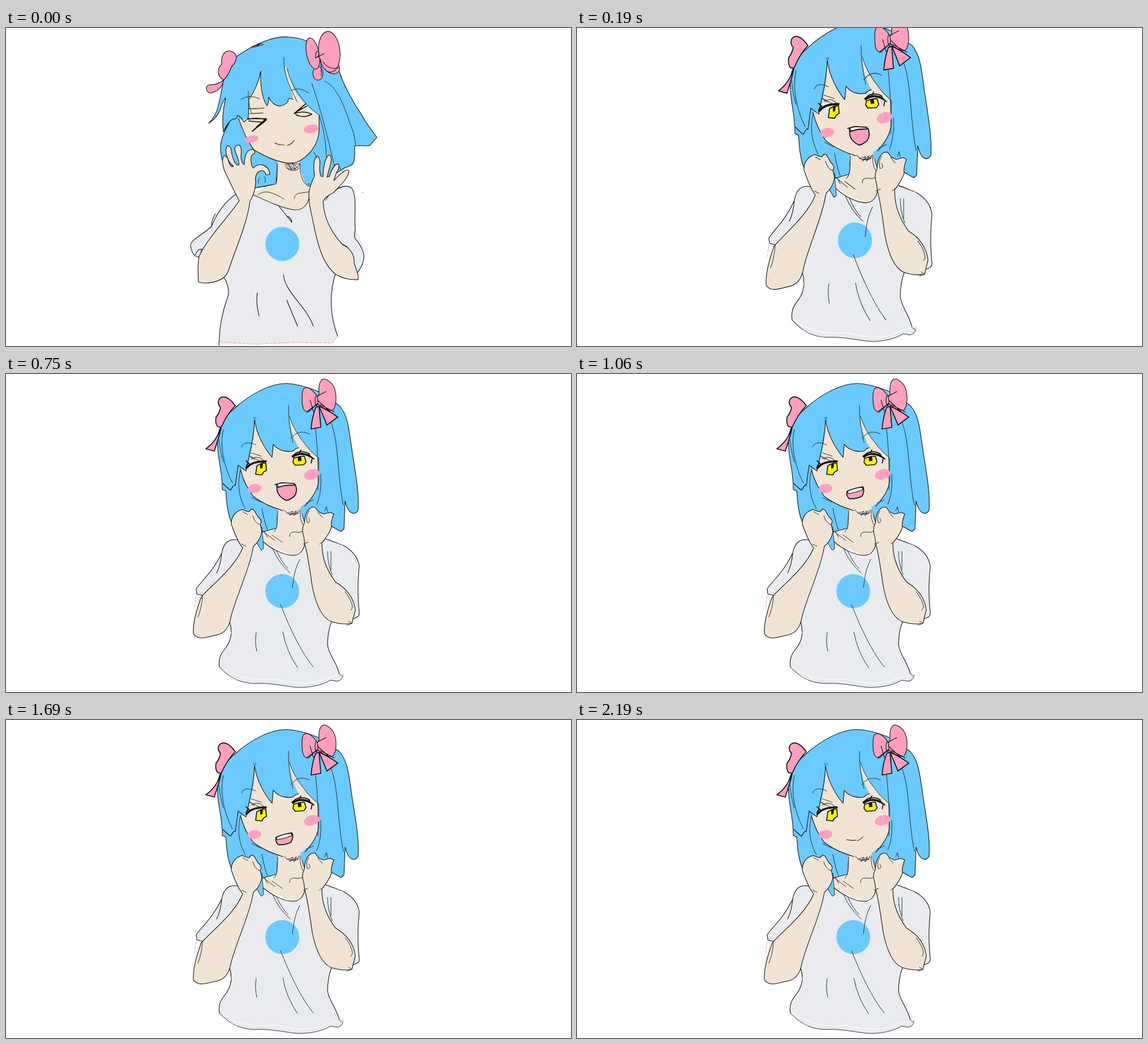
An HTML page for the animation above (2250 ms loop, 998 by 561 pixels).

```html
<!DOCTYPE html>
<html lang="en">
<head>
<meta charset="utf-8">
<title>Cheer and chat</title>
<style>
html, body { margin: 0; width: 100%; height: 100%; overflow: hidden; background: #fff; }
svg { display: block; width: 100vw; height: 100vh; }
path, ellipse { fill: none; stroke-linecap: round; stroke-linejoin: round; }
.line { stroke: #111; stroke-width: 1.1; }
.soft { stroke: #26323a; stroke-width: 1; }
.bold { stroke: #111; stroke-width: 1.7; }
.lash { stroke: #111; stroke-width: 3.6; }
.hem { stroke: #ee9db0; stroke-width: 1; stroke-dasharray: 5 3; }
.hair { fill: #6bcaff; }
.skin { fill: #f1e4d4; }
.shirt { fill: #e9ebee; }
.pink { fill: #ff9fbd; }
.blush { fill: #ff9fc0; }
.mark { fill: #6bcaff; }
.white { fill: #fff; }
.sclera { fill: #e4e5eb; }
.iris { fill: #fff200; }
.ink { fill: #111; }
</style>
</head>
<body>
<svg viewBox="0 0 998 561">
<g id="cheer">
  <path class="hair line" d="M405 52C440 27 475 13 500 16C514 17 526 20 535 25L588 74C594 96 612 130 630 156C638 172 650 185 655 193C650 199 645 204 643 207C636 210 628 206 616 208C616 225 617 237 610 242C602 246 597 246 592 251L545 279L522 279L519 238L479 238L477 275L440 282L388 250C379 230 377 210 381 197C384 186 388 178 394 168Q388 177 384 183C381 160 384 140 388 123Q381 132 378 145Q371 161 358 168Q371 155 375 137C379 120 382 105 384 92C387 76 396 62 405 52Z"/>
  <path class="skin" d="M479 232L478 273C465 281 445 284 432 294L440 310L520 322L545 294L530 276Q521 262 519 235Z"/>
  <path class="soft" d="M479 238C480 255 479 268 477 275Q459 280 441 282M519 238C519 254 521 268 530 276L537 275M456 262Q460 266 457 272M449 264Q444 269 446 274"/>

  <path class="shirt" d="M408 292C388 305 373 325 363 350C346 366 325 374 326 384C328 399 335 405 342 404L383 437C394 453 396 468 389 482C379 513 377 535 376 558L577 556L586 543C573 510 570 470 582 434L624 432C637 405 634 385 617 356C614 330 621 299 611 283C600 273 578 284 562 299L537 300Q530 316 518 320C500 323 473 309 432 295Z"/>
  <path class="line" d="M408 292C388 305 373 325 363 350C346 366 325 374 326 384C328 399 335 405 342 404L346 390L340 391L334 400M363 350Q363 338 370 328M432 292C460 305 490 319 510 321Q532 322 537 293M562 303C578 284 600 273 611 283C621 299 614 330 617 356Q613 370 620 375C634 395 635 404 628 420L620 433M383 437C394 453 396 468 389 482C379 513 377 535 376 560M582 434C570 470 573 510 586 544"/>
  <path class="hem" d="M372 558L376 553L440 558L510 554L577 556L586 543"/>
  <path class="soft" d="M445 294Q455 287 466 290Q480 294 491 302M509 301Q511 290 523 291L535 289"/>
  <ellipse class="mark" cx="488" cy="381" rx="30" ry="30"/>
  <path class="line" d="M481 313L505 343M496 332Q503 333 505 342M444 467Q441 483 447 508M490 435C493 467 530 490 543 526M496 480Q504 500 515 526"/>

  <path class="skin" d="M411 160Q422 164 428 158L429 126Q444 105 450 77C449 100 452 124 461 137Q464 133 464 122C473 140 487 142 498 130Q497 121 507 126C505 105 492 87 493 67C504 84 503 105 516 119Q533 143 553 153L553 181C551 208 532 229 513 237C491 243 462 229 438 216Q418 189 411 160Z"/>
  <path class="line" d="M384 183Q392 165 400 161Q408 161 409 154Q417 158 420 166Q426 162 428 158L429 126Q444 105 450 77C449 100 452 124 461 137Q464 133 464 122C473 140 487 142 498 130Q497 121 507 126M411 160Q422 194 438 215C462 229 491 243 513 237C532 229 552 208 553 181L553 153"/>
  <path class="soft" d="M491 52C489 84 503 105 514 130M497 72C503 105 532 140 553 153M415 126Q430 116 448 125M428 112Q427 134 434 150M503 110Q520 103 535 115M540 97C560 155 572 210 580 243M563 94C590 106 600 150 614 185L618 207M553 154C565 185 565 220 567 240M450 76L448 81"/>
  <path class="line" d="M434 33L452 27M437 34L455 29M442 33L448 28M429 142Q442 143 456 141M430 151L454 150"/>
  <path class="bold" d="M428 161Q444 157 460 162L435 182M429 164Q442 166 456 166L438 179M427 160L460 160L442 175M529 134L509 151Q526 145 540 152Q526 160 512 153M531 138L511 149"/>
  <path class="line" d="M475 203Q483 207 491 206M497 207Q505 205 509 198"/>
  <ellipse class="blush" cx="434" cy="196" rx="12" ry="6" transform="rotate(-12 434 196)"/>
  <ellipse class="blush" cx="539" cy="178" rx="13" ry="7.5" transform="rotate(-12 539 178)"/>
  <path class="soft" d="M492 242Q505 258 520 240L494 240L506 250L498 240L512 250L505 238L516 247M495 247Q507 256 517 248"/>

  <path class="pink line" d="M384 92C373 85 372 72 381 64C379 43 391 36 402 43C411 50 406 60 398 69Q393 84 384 92C384 102 374 112 362 115C352 114 351 101 360 100Q373 101 384 92Z"/>
  <ellipse class="pink line" cx="551" cy="80" rx="9" ry="12"/>
  <ellipse class="pink line" cx="576" cy="69" rx="14" ry="11" transform="rotate(30 576 69)"/>
  <ellipse class="pink line" cx="542" cy="45" rx="11" ry="28" transform="rotate(-12 542 45)"/>
  <ellipse class="pink line" cx="571" cy="42" rx="19" ry="36" transform="rotate(-5 571 42)"/>
  <path class="line" d="M547 52Q546 41 551 41Q556 48 547 53L562 45M556 55Q557 70 557 84M560 60Q570 75 588 70"/>

  <path class="skin line" d="M412 305C404 290 397 275 388 256C381 243 381 227 386 225Q392 227 394 238Q397 246 402 244C390 235 385 215 391 208Q397 207 398 216C400 232 406 243 411 242C414 235 404 220 404 212Q407 205 413 207Q417 213 415 225Q415 238 421 241C421 228 424 215 435 214Q441 216 439 221Q431 224 433 236Q433 243 437 247C448 235 465 243 466 258Q463 260 459 258Q456 249 447 253Q439 258 441 272Q440 292 431 305C426 345 407 385 394 425Q387 450 349 450L340 448Q338 420 341 403C354 373 392 334 412 305Z"/>
  <path class="skin line" d="M545 261C542 240 545 226 550 226Q556 230 554 245Q554 258 557 262L560 262C560 244 565 224 572 224Q577 230 572 245L567 263L571 262C575 250 581 239 587 240Q590 246 584 255L579 269C588 260 601 246 606 252C604 266 591 277 578 291Q565 296 560 306C562 338 575 360 594 382Q616 392 615 415L622 436L622 444Q600 445 583 435C553 412 547 361 539 326Q535 309 535 292Q536 279 545 261Z"/>
  <path class="soft" d="M544 219Q548 225 549 230M588 243L592 251M592 380L603 386M565 304L570 296M630 290L631 291"/>
</g>

<g id="talk">
  <path id="mane" class="hair line"/>
  <path class="skin" d="M480 234L478 274L456 279L453 296L508 321L534 302L527 270L520 234Z"/>
  <path class="soft" d="M480 242L479 265Q478 274 473 279M520 240Q518 259 526 267"/>

  <path class="shirt" d="M410 293Q386 288 381 316C365 350 345 365 336 379L337 388L353 392L395 437C402 460 395 475 385 487Q374 500 377 517C395 535 410 545 440 546C470 544 500 553 520 553C550 552 565 545 573 540L585 542Q594 540 595 533L589 530C585 510 570 495 568 478Q568 455 575 437L612 432Q625 429 624 422C621 390 621 370 624 339Q621 316 595 302L565 291L528 298Q525 318 508 320C490 320 468 308 453 295Z"/>
  <path class="line" d="M410 293Q386 288 381 316C365 350 345 365 336 379L337 388L353 392M381 316Q379 338 372 351M395 437C402 460 395 475 385 487Q374 500 377 517M453 295C468 308 490 320 508 320Q525 318 528 298M565 291L595 302Q621 316 624 339C621 370 621 390 624 422Q625 429 612 432M575 437Q568 455 568 478C570 495 585 510 589 530"/>
  <path class="soft" d="M377 517C395 535 410 545 440 546C470 544 500 553 520 553C550 552 565 545 573 540L585 542Q594 540 595 533L589 530"/>
  <path d="M379 515C410 540 445 541 475 538C510 548 540 548 566 537L590 530" stroke="#fff"/>
  <path class="hem" d="M390 530L408 540M570 291L595 302M396 448L399 463M336 391L333 411M587 528L596 529L594 537"/>
  <path class="soft" d="M453 277L475 294M462 288L456 277M470 284L488 297M501 287Q500 277 513 279Q521 281 527 274"/>
  <ellipse class="mark" cx="488" cy="383" rx="30" ry="30"/>
  <path class="soft" d="M471 308Q481 333 502 351M478 312Q488 334 498 343M519 327C510 344 508 359 506 377M485 407C502 450 521 490 543 517M489 455Q495 489 515 518M442 456Q439 473 443 489M568 313Q568 335 576 354M574 313L574 346"/>

  <path class="skin" d="M414 168Q424 170 428 158Q440 112 439 80C442 106 457 132 470 147Q471 137 472 124C481 135 494 138 507 136Q511 131 517 130C508 115 500 91 501 75C507 95 517 110 527 122Q535 134 552 148L552 191C548 212 530 232 508 241C485 244 456 230 437 216Q421 196 414 168Z"/>
  <path class="line" d="M383 193Q393 203 397 205Q403 193 405 197Q407 182 410 161Q417 166 424 171Q429 146 433 128Q438 104 439 80C442 106 457 132 470 147Q471 137 472 124C481 135 494 138 507 136Q511 131 517 130M414 168Q421 196 437 216C456 230 473 236 489 241M528 233Q548 212 552 191L552 148"/>
  <path class="soft" d="M437 78Q440 75 442 79M499 55Q498 84 507 121M501 75C507 95 517 110 527 122Q535 134 552 148M416 129Q421 116 441 125M503 114Q517 96 536 106M546 90C550 125 552 160 551 204M574 85C588 120 585 180 596 232M384 98C376 130 388 170 400 192M376 115Q379 140 384 155M414 170C407 200 414 222 423 238M452 237Q456 260 462 275M556 177Q558 210 549 230M439 151L429 144L455 157M433 150Q445 142 456 153M433 139L451 145M434 218L450 226M530 228L543 222"/>
  <ellipse class="blush" cx="439" cy="202" rx="12" ry="8" transform="rotate(-8 439 202)"/>
  <ellipse class="blush" cx="540" cy="177" rx="14" ry="9" transform="rotate(-18 540 177)"/>
  <path class="soft" d="M491 240Q505 256 519 239M496 246L507 242L501 250L513 241L508 250L518 243M500 247L516 246"/>

  <g id="eyesOpen">
    <path class="sclera" d="M428 166Q434 156 446 157L442 177Q433 174 428 166ZM508 147Q522 138 538 145L531 160L510 158Z"/>
    <path class="iris bold" d="M443 162Q450 157 459 157L460 170L455 173L452 178L441 177ZM508 149Q517 145 527 145L530 155L526 160L511 161L507 156Z"/>
    <path class="ink" d="M449 158L454 157L453 166L449 167ZM515 146L521 145L522 153L516 154Z"/>
    <path class="lash" d="M426 165Q434 154 459 154M507 146Q518 137 536 144"/>
    <path class="bold" d="M424 168Q423 162 429 157M430 159L424 153M505 145L515 138M518 139L521 134M524 140L541 148L539 157M535 143L544 150M511 140Q524 134 536 141"/>
  </g>
  <g id="eyesShut">
    <path class="lash" d="M426 168Q442 176 460 165M507 154Q523 161 540 149"/>
    <path class="bold" d="M426 168L422 165M540 149L544 146"/>
  </g>

  <g id="mouthShut"><path class="line" d="M476 211Q485 213 493 212M495 213Q501 211 505 206"/></g>
  <g id="mouthHalf">
    <path class="pink bold" d="M477 207Q490 201 505 199Q509 207 503 216Q492 221 481 220Q475 215 477 207Z"/>
    <path class="white line" d="M478 207Q490 201 504 200L505 204Q493 209 479 211Z"/>
  </g>
  <g id="mouthOpen">
    <path class="pink bold" d="M478 195Q494 191 511 195Q516 207 509 216Q500 223 495 223Q483 218 479 207Z"/>
    <path class="white line" d="M479 195L485 192L508 193L510 196L495 196L482 200Z"/>
    <path class="bold" d="M475 195L488 192L509 193M479 200L492 197L510 196"/>
  </g>

  <path class="pink bold" d="M405 56C393 39 382 37 376 45Q373 53 379 59Q377 69 371 76Q369 88 374 93L380 94C374 113 364 124 353 132L368 136C373 119 378 107 380 94Q392 68 405 56Z"/>
  <path class="pink bold" d="M547 59Q540 78 539 97L556 94L553 57ZM553 57Q560 73 567 90L586 76Q568 63 553 57Z"/>
  <path class="pink line" d="M550 40C535 18 523 20 523 38C522 62 527 67 534 67Q545 57 550 52Q566 66 577 64C585 55 585 31 577 19Q567 7 560 9Q551 13 553 36Z"/>
  <path class="line" d="M547 38Q544 52 549 57Q553 50 549 38M550 39L565 31M531 67L549 53M550 46L572 66M555 54L580 67M543 66L537 46"/>

  <path class="hair soft" d="M439 282L452 270L455 308L451 311L443 298Z"/>
  <path class="skin line" d="M425 242L417 239C405 242 397 253 398 265Q405 285 412 298L418 307C404 341 365 371 345 393C336 417 330 440 331 458Q337 468 352 465L374 460Q393 455 397 430C405 397 426 353 434 318L437 304Q449 294 452 278L449 265Q454 259 445 252L438 240L434 238L429 243Z"/>
  <path class="skin line" d="M540 235Q528 241 527 263Q521 274 526 287L528 301C534 322 537 349 541 375C547 405 557 430 575 437Q595 443 611 440L617 416Q613 385 582 367C563 341 558 320 558 298Q570 284 575 270Q573 262 579 247L573 244L561 247L552 243L546 235Z"/>
  <path class="soft" d="M427 248L418 243M436 250Q439 263 449 266M347 391Q346 412 339 429M535 242Q529 250 532 262Q540 263 535 254M551 244L559 253M563 241L566 234L568 243M599 384Q611 399 612 412L609 417M416 300L424 304M554 300L562 294M525 300L533 297M602 443L611 440L605 436"/>
</g>
</svg>

<script>
const LOOP = 2250, TICKS = 36, FLOOR = 553;
const el = id => document.getElementById(id);
const show = (id, on) => { el(id).style.display = on ? '' : 'none'; };

const crown = 'M402 62C430 36 470 14 500 17Q530 20 560 35L589 56';
const manes = {
  calm: crown + 'C606 75 606 105 612 140C618 180 624 210 622 240Q618 248 611 245Q603 242 599 224L597 273L592 278L570 266L530 270L520 239L480 240L478 272L452 279L400 266C388 240 390 215 388 206L382 204C383 170 371 145 374 108Q382 78 402 62Z',
  flying: crown + 'C604 90 608 130 611 180C613 215 622 238 638 246Q616 245 606 210C605 240 604 270 592 284Q584 290 571 281L530 270L520 239L480 240L478 272L452 279L405 293Q393 285 389 268Q378 274 364 273C378 268 381 240 391 197L384 192L382 130Q380 160 365 174Q378 152 374 108Q382 78 402 62Z'
};

// one letter per tick: c shut, h half, o open
const mouths = 'oooooooohochoochohcc' + 'ohhchoohc' + 'hohcohc';
const shutEyes = [15, 16];
// vertical stretch above the hem and sideways shift, by tick
const hops = { 2: [1.135, 7], 3: [1.05, 3], 4: [.975, 0], 5: [.975, 0] };

const tickStart = n => Math.round(n * 6.25) * 10;
function tickAt(ms) {
  const n = Math.floor(ms * TICKS / LOOP);
  if (ms < tickStart(n)) return n - 1;
  return n < TICKS - 1 && ms >= tickStart(n + 1) ? n + 1 : n;
}

let last = -1;
function draw(ms) {
  const n = tickAt(ms);
  if (n === last) return;
  last = n;
  const [k, dx] = hops[n] || [1, 0], blink = shutEyes.includes(n);
  show('cheer', n < 2);
  show('talk', n >= 2);
  el('talk').setAttribute('transform', `translate(${dx} ${FLOOR * (1 - k)}) scale(1 ${k})`);
  el('mane').setAttribute('d', n === 2 ? manes.flying : manes.calm);
  show('eyesOpen', !blink);
  show('eyesShut', blink);
  show('mouthShut', mouths[n] === 'c');
  show('mouthHalf', mouths[n] === 'h');
  show('mouthOpen', mouths[n] === 'o');
}

const start = performance.now();
function loop() {
  draw((performance.now() - start) % LOOP);
  requestAnimationFrame(loop);
}
loop();
</script>
</body>
</html>
```
